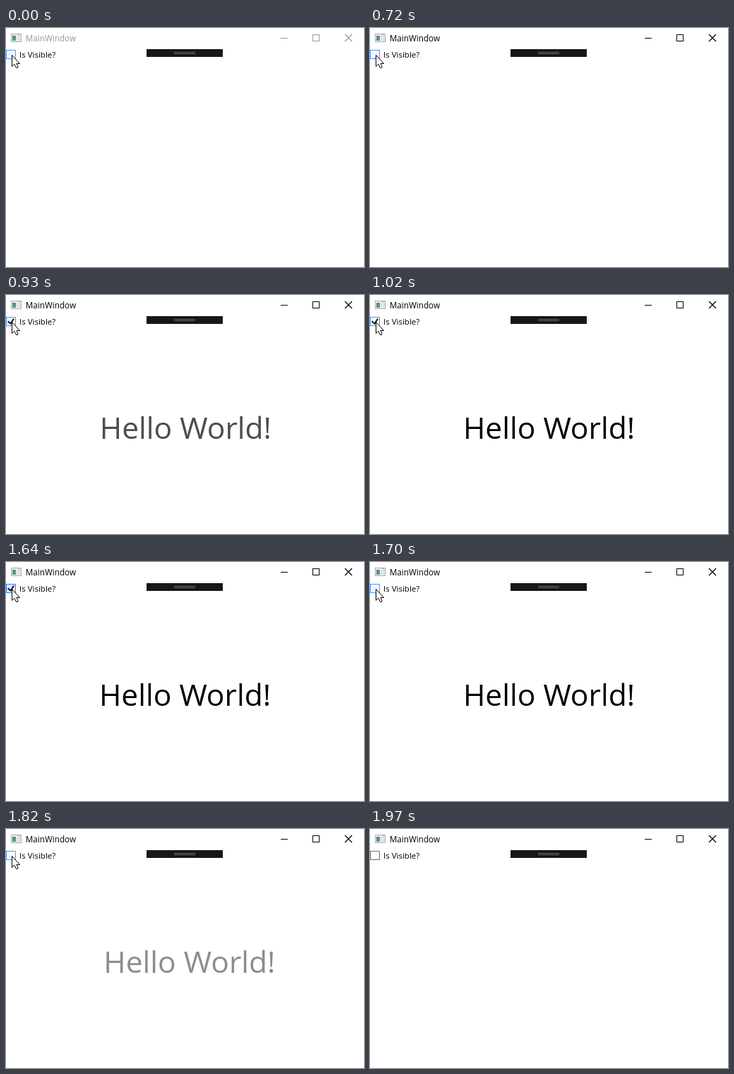
These frames come from a looping animation (507 px wide and 339 px high, 2720 ms). An HTML page with a canvas:

```html
<!DOCTYPE html>
<html lang="en">
<head>
<meta charset="utf-8">
<title>MainWindow</title>
<style>
  html, body { margin: 0; width: 100%; height: 100%; overflow: hidden; background: #fff; }
  canvas { display: block; }
</style>
</head>
<body>
<canvas id="stage" width="507" height="339"></canvas>
<script>
const ctx = document.getElementById('stage').getContext('2d');
const LOOP = 2720;
const STEPS = [0, 720, 780, 840, 930, 1020, 1640, 1700, 1760, 1820, 1880, 1970];
const FAMILY = '"Open Sans", "Noto Sans", sans-serif';

const clamp = v => Math.min(1, Math.max(0, v));
const easeOut = (p, power) => 1 - (1 - p) ** power;

function rect(x, y, w, h, color) {
  ctx.fillStyle = color;
  ctx.fillRect(x, y, w, h);
}

function path(points, closed) {
  ctx.beginPath();
  points.forEach(([x, y]) => ctx.lineTo(x, y));
  if (closed) ctx.closePath();
}

function fill(points, color) {
  path(points, true);
  ctx.fillStyle = color;
  ctx.fill();
}

function stroke(points, color, width = 1, closed = false) {
  path(points, closed);
  ctx.strokeStyle = color;
  ctx.lineWidth = width;
  ctx.stroke();
}

function label(text, x, y, size, color) {
  ctx.font = `${size}px ${FAMILY}`;
  ctx.fillStyle = color;
  ctx.fillText(text, x, y);
}

function drawIcon() {
  const pane = ctx.createLinearGradient(8, 10, 14, 18);
  pane.addColorStop(0, '#4d7f9c');
  pane.addColorStop(1, '#5ba67a');
  rect(7, 8, 15, 12, '#a9adb0');
  rect(8, 9, 13, 10, '#eceeef');
  rect(9, 11, 5, 7, pane);
  rect(15, 11, 5, 7, '#dde3e6');
  rect(17, 9, 3, 1, '#a5b2bb');
}

function drawTitleBar(active) {
  const ink = active ? '#000' : '#999';
  drawIcon();
  label('MainWindow', 27.8, 19, 11.7, ink);

  rect(389, 14, 10, 1, ink);
  ctx.strokeStyle = ink;
  ctx.lineWidth = 1;
  ctx.strokeRect(434.5, 9.5, 9, 9);
  stroke([[480, 9], [490, 19]], ink, 1.2);
  stroke([[490, 9], [480, 19]], ink, 1.2);
}

function drawToolbar() {
  rect(199, 30, 108, 11, '#15181a');
  rect(238, 34, 30, 1, '#65696b');
  rect(238, 36, 30, 1, '#65696b');
}

function drawCheckBox(checked, look) {
  const [border, background] = {
    normal: ['#707070', '#fff'],
    hover: ['#5593ff', '#f3f9ff'],
    pressed: ['#3c77dd', '#d9ecff']
  }[look];
  rect(0, 31, 14, 13, border);
  rect(1, 32, 12, 11, background);
  if (checked) {
    fill([[12, 34.2], [6.7, 42.1], [6.5, 42.1], [2, 38.2],
          [3.3, 36.5], [6.3, 39.1], [10.3, 33]], '#212121');
  }
  label('Is Visible?', 19, 42, 11.5, '#000');
}

function drawCursor() {
  const arrow = [[8.5, 38.5], [8.5, 54.5], [11.8, 51.2], [14.5, 56.5],
                 [16.5, 56.5], [17, 55], [15, 50.5], [19.5, 50.5]];
  fill(arrow, '#fff');
  stroke(arrow, '#000', 1, true);
}

function drawGreeting(t) {
  const enter = clamp((t - 790) / 200);
  const leave = clamp((t - 1710) / 200);
  const opacity = enter - leave;
  if (opacity <= 0) return;
  const shift = 10 * (1 - easeOut(enter, 2)) + 7 * easeOut(leave, 3);
  ctx.globalAlpha = opacity;
  ctx.textAlign = 'center';
  label('Hello World!', 253.5 + shift, 204, 42.5, '#000');
  ctx.textAlign = 'left';
  ctx.globalAlpha = 1;
}

function draw(t) {
  rect(0, 0, 507, 339, '#fff');
  const pressed = (t >= 780 && t < 840) || (t >= 1640 && t < 1700);
  const pointing = t < 1970;
  drawTitleBar(t >= 720);
  drawToolbar();
  drawCheckBox(t >= 840 && t < 1700, pressed ? 'pressed' : pointing ? 'hover' : 'normal');
  drawGreeting(t);
  if (pointing) drawCursor();
}

const start = performance.now();
function tick() {
  const t = (performance.now() - start) % LOOP;
  // The picture refreshes only at these moments.
  draw(STEPS.filter(step => step <= t).pop() ?? 0);
  requestAnimationFrame(tick);
}
tick();
</script>
</body>
</html>
```
